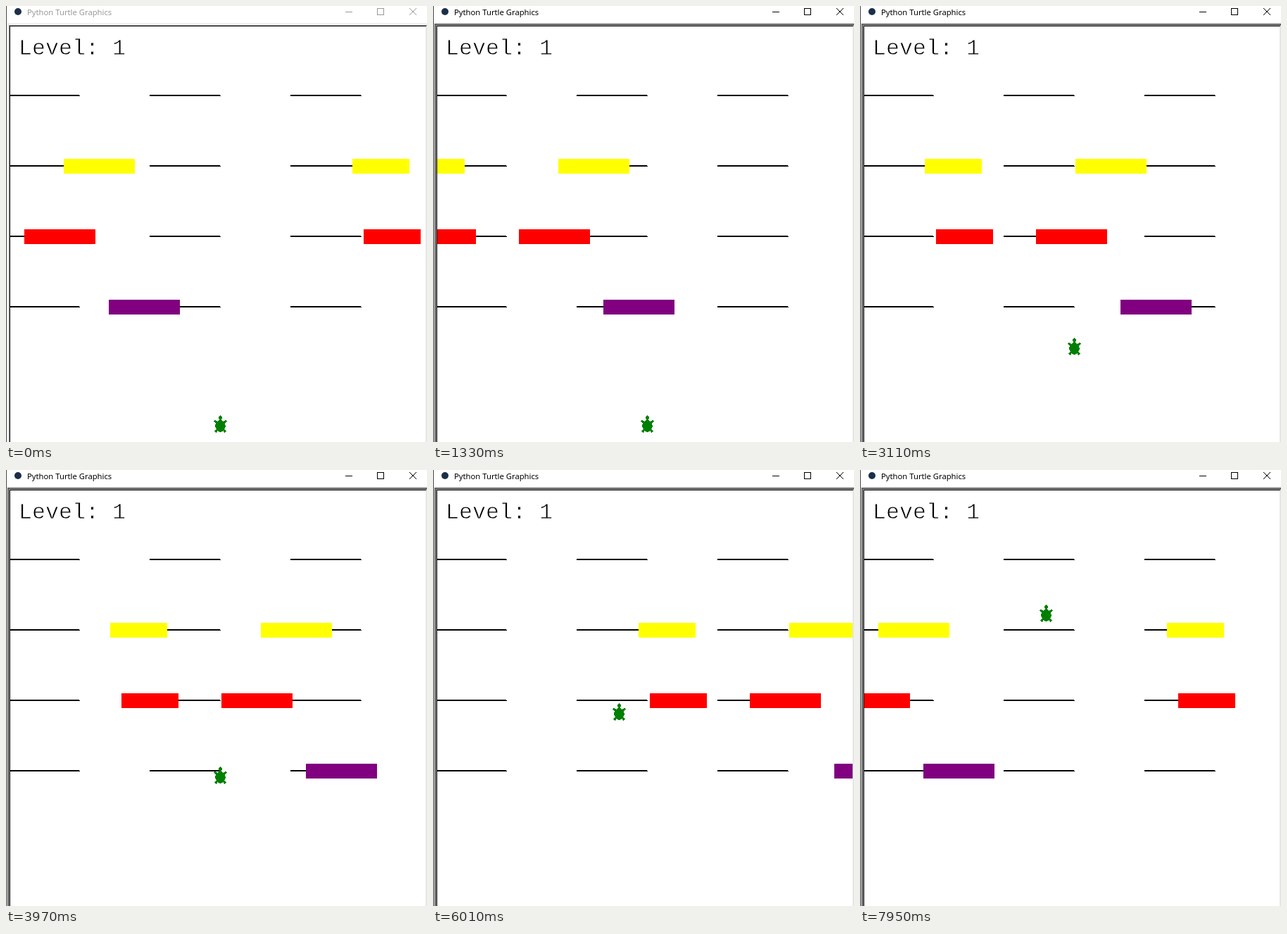
These frames come from a looping animation (598 px wide and 619 px high, 8000 ms). An HTML page:

```html
<!DOCTYPE html>
<html lang="en">
<head>
<meta charset="utf-8">
<title>Python Turtle Graphics</title>
<style>
  html, body { margin: 0; width: 100%; height: 100%; overflow: hidden; background: #fff; }
  svg { display: block; }
  .title { font: 11.25px "Segoe UI", "Open Sans", sans-serif; }
  .level { font: 31.7px "Courier New", "Liberation Mono", monospace; stroke: #fff; stroke-width: .8px; }
</style>
</head>
<body>
<svg width="598" height="619" viewBox="0 0 598 619">
  <defs><clipPath id="field"><rect x="6" y="29" width="590" height="590"/></clipPath></defs>
  <rect width="598" height="619" fill="#fff"/>

  <circle cx="17" cy="8" r="5" fill="#1c2f4a"/>
  <g id="chrome">
    <text class="title" x="30" y="13" fill="currentColor">Python Turtle Graphics</text>
    <g fill="none" stroke="currentColor">
      <path d="M482 8.5h10M527.5 3.5h9v9h-9z" shape-rendering="crispEdges"/>
      <path d="M573 3l10 10M583 3l-10 10"/>
    </g>
  </g>

  <g shape-rendering="crispEdges">
    <path d="M1 24H598V25H2V619H1Z" fill="#f0f0f0"/>
    <path id="focus" d="M2 25H598V27H4V619H2Z"/>
    <path d="M4 27H598V28H5V619H4Z" fill="#999"/>
    <path d="M5 28H597V29H6V619H5Z" fill="#000"/>
    <rect x="596" y="29" width="2" height="590" fill="#e6e6e6"/>
    <rect width="1" height="619" fill="#444"/>
  </g>

  <g clip-path="url(#field)">
    <g id="lanes" shape-rendering="crispEdges"></g>
    <text class="level" x="18" y="69">Level: 1</text>
    <g id="cars" shape-rendering="crispEdges"></g>
    <polygon id="turtle" fill="green" stroke="green" shape-rendering="crispEdges"/>
  </g>
</svg>
<script>
const LOOP = 8000, MIDDLE = 304, SPEED = 8, EDGE = 300, LAP = 624;
const REFRESH = 78, REFRESHES_PER_TICK = 1.433;
const byId = id => document.getElementById(id);

function add(parent, tag, attrs) {
  const node = document.createElementNS("http://www.w3.org/2000/svg", tag);
  for (const key in attrs) node.setAttribute(key, attrs[key]);
  return parent.appendChild(node);
}

for (let y = 126; y <= 426; y += 100)
  for (let x = 4; x <= 404; x += 200)
    add(byId("lanes"), "path", { d: `M${x} ${y}h100v1h1v1h-101z` });

function car(start, y, width, fill) {
  const node = add(byId("cars"), "rect", { y, width, height: 21, fill });
  return { start, node, half: (width - 1) / 2 };
}

const cars = [
  car(-172, 217, 101, "yellow"), car(228, 217, 81, "yellow"),
  car(-228, 317, 101, "red"), car(244, 317, 81, "red"),
  car(-108, 417, 101, "purple")
];

// right half of the turtle, nose to tail, y up
const side = [[0, 16], [2, 14], [1, 10], [4, 7], [7, 9], [9, 8], [6, 5],
  [7, 1], [5, -3], [8, -6], [6, -8], [4, -5], [0, -7]];
const outline = side.concat(side.slice(1, -1).reverse().map(([x, y]) => [-x, y]));
byId("turtle").setAttribute("points", outline.map(([x, y]) => `${x},${-y}`).join(" "));

// the game ticks a little slower than the screen refreshes
function ticksAt(t) {
  const refresh = Math.floor((t - 56) / REFRESH);
  return Math.floor((refresh + 1.25) / REFRESHES_PER_TICK);
}

// whole hops made by tick k when count hops are spread over from..to
function hops(k, from, to, count) {
  const passed = Math.min(Math.max(k - from, 0), to - from);
  return Math.floor(passed * count / (to - from));
}

function draw(t) {
  const k = ticksAt(t), active = t >= 70;
  byId("chrome").setAttribute("color", active ? "#000" : "#999");
  byId("focus").setAttribute("fill", active ? "#646464" : "#f0f0f0");

  for (const { start, half, node } of cars) {
    const offset = (start + SPEED * k + EDGE) % LAP - EDGE;
    node.setAttribute("x", MIDDLE + offset - half);
  }

  const left = hops(k, 42, 47, 4);
  const up = hops(k, 12, 42, 21) + hops(k, 47, 71, 18);
  byId("turtle").setAttribute("transform",
    `translate(${MIDDLE + 0.5 - 10 * left} ${597.5 - 10 * up})`);
}

const begin = performance.now();
function frame() {
  draw((performance.now() - begin) % LOOP);
  requestAnimationFrame(frame);
}
frame();
</script>
</body>
</html>
```
